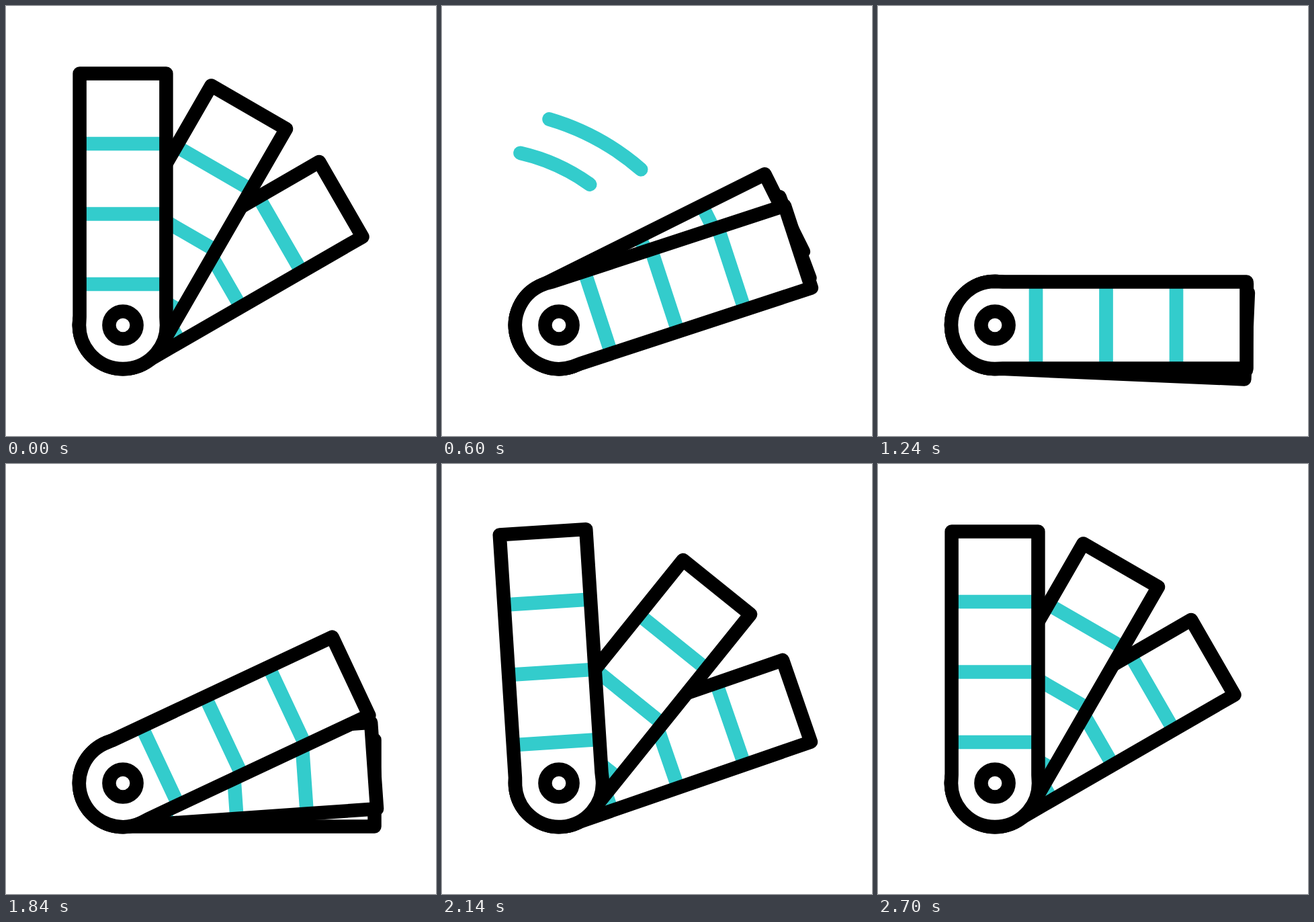
Recreate the animation shown at these times as an HTML page. Size 640x640 px, loop 3 s.

```html
<!DOCTYPE html>
<html lang="en">
<head>
<meta charset="utf-8">
<title>Swatch fan</title>
<style>
  html, body { margin: 0; width: 100%; height: 100%; overflow: hidden; background: #fff; }
  svg { display: block; width: 100vw; height: 100vh; }
  .line { stroke: #000; stroke-width: 20.5; stroke-linejoin: round; fill: none; }
  .tint { stroke: #3cc; stroke-width: 20.7; fill: none; }
  .trail { stroke-linecap: round; }
</style>
</head>
<body>
<svg viewBox="0 0 640 640">
  <defs>
    <g id="blade">
      <path fill="#fff" d="M65 0A65 65 0 0 1-65 0L-64.4-12V-374.5H64.4V-12Z"/>
      <path class="tint" d="M-60-270H60M-60-165.5H60M-60-61H60"/>
      <path class="line" d="M65 0A65 65 0 0 1-65 0L-64.4-12V-374.5H64.4V-12Z"/>
    </g>
  </defs>
  <g id="trails"></g>
  <g id="fan" transform="translate(174 475)"></g>
  <circle class="line" cx="174" cy="475" r="20.6"/>
</svg>
<script>
const LOOP = 3000;
const NS = "http://www.w3.org/2000/svg";

// Keys are [time, degrees]; blades are listed from back to front.
const blades = [
  { keys: [[400, 60], [1000, 97], [1400, 90], [1860, 90], [2409, 53], [2700, 60]] },
  { keys: [[300, 30], [900, 97], [1300, 90], [1757, 90], [2317, 23], [2610, 30]] },
  { keys: [[200, 0], [800, 97], [1200, 90], [1660, 90], [2200, -7], [2500, 0]] }
];

// Arcs whose head runs ahead of their tail; angles are clockwise from the top.
const trails = [
  { x: 56, y: 519.5, r: 366, from: 3.1, to: 41, head: [200, 600], tail: [400, 900] },
  { x: 53.4, y: 496.7, r: 285, from: 12.8, to: 58.8, head: [400, 800], tail: [600, 1100] }
];

function add(parent, tag, attrs) {
  const el = document.createElementNS(NS, tag);
  for (const name in attrs) el.setAttribute(name, attrs[name]);
  return document.getElementById(parent).appendChild(el);
}

for (const b of blades) b.el = add("fan", "use", { href: "#blade" });
for (const s of trails) s.el = add("trails", "path", { class: "tint trail" });

function ease(t, start, end) {
  const p = Math.min(1, Math.max(0, (t - start) / (end - start)));
  return p * p * (3 - 2 * p);
}

function angleAt(keys, t) {
  let angle = keys[0][1];
  for (let i = 1; i < keys.length; i++) {
    const [t0, a0] = keys[i - 1], [t1, a1] = keys[i];
    angle += (a1 - a0) * ease(t, t0, t1);
  }
  return angle;
}

function pointOn(s, part) {
  const a = (s.from + (s.to - s.from) * part) * Math.PI / 180;
  return `${s.x + s.r * Math.sin(a)} ${s.y - s.r * Math.cos(a)}`;
}

function draw(t) {
  for (const b of blades) b.el.setAttribute("transform", `rotate(${angleAt(b.keys, t)})`);
  for (const s of trails) {
    const head = ease(t, ...s.head), tail = ease(t, ...s.tail);
    const d = head - tail > 0.0005
      ? `M${pointOn(s, tail)}A${s.r} ${s.r} 0 0 1 ${pointOn(s, head)}` : "";
    s.el.setAttribute("d", d);
  }
}

let start;
function tick(now) {
  if (start === undefined) start = now;
  draw((now - start) % LOOP);
  requestAnimationFrame(tick);
}
draw(0);
requestAnimationFrame(tick);
</script>
</body>
</html>
```
